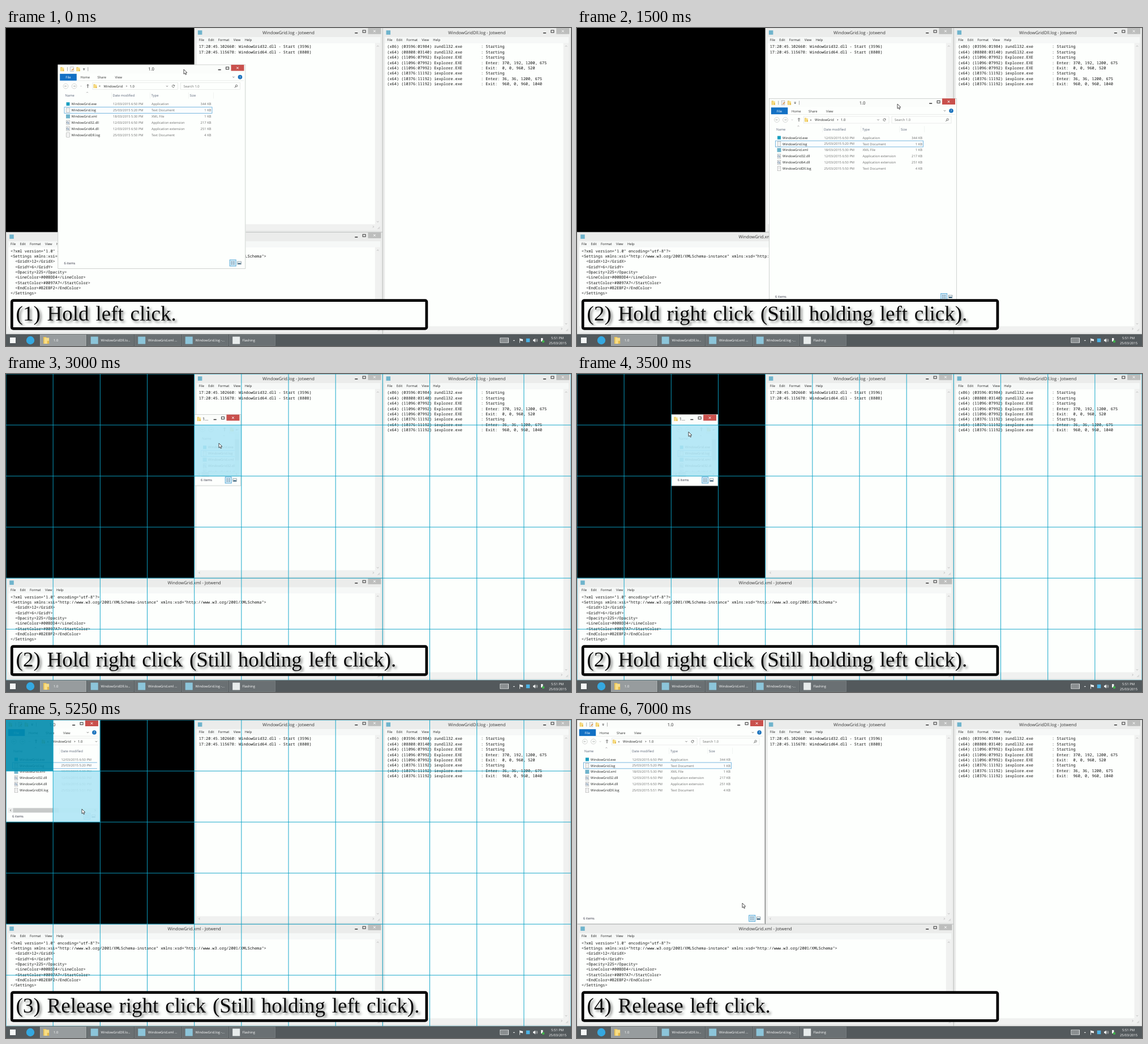
Animation, 998 px wide and 561 px high, one loop 8000 ms. Source, as an HTML page with a canvas:

```html
<!DOCTYPE html>
<html lang="en">
<head>
<meta charset="utf-8">
<title>Snapping a window to a grid</title>
<style>
html, body { margin: 0; width: 100%; height: 100%; overflow: hidden; background: #000; }
canvas { display: block; }
</style>
</head>
<body>
<canvas id="stage" width="998" height="561"></canvas>
<script>
const ctx = document.getElementById('stage').getContext('2d');
ctx.textRendering = 'geometricPrecision';

const LOOP = 8000;
// A 1920 x 1080 desktop with a 40 px taskbar, scaled to the stage.
const DESK_H = 561 * 1040 / 1080;
const CELL_W = 998 / 12, CELL_H = DESK_H / 6;
const UI = '"Open Sans", "Noto Sans", sans-serif';
const MONO = '"Noto Sans Mono", "DejaVu Sans Mono", monospace';
const SERIF = '"Liberation Serif", "Times New Roman", serif';
const WHITE = '#fdfffd', INK = '#222', GREY = '#6d6d6d', LINE = '#dcdedd';
const APP = 'Jotwend';

const CAPTIONS = [
  [6000, '(4) Release left click.'],
  [4250, '(3) Release right click (Still holding left click).'],
  [1500, '(2) Hold right click (Still holding left click).'],
  [0, '(1) Hold left click.']
];

const LOG = [
  '17:20:45.102660: WindowGrid32.dll - Start (3596)',
  '17:20:45.115678: WindowGrid64.dll - Start (8808)'
];

const DLL_LOG = [
  ['(x86) (03596:01984)', 'rundll32.exe', 'Starting'],
  ['(x64) (08808:03140)', 'rundll32.exe', 'Starting'],
  ['(x64) (11096:07992)', 'Explorer.EXE', 'Starting'],
  ['(x64) (11096:07992)', 'Explorer.EXE', 'Enter: 370, 192, 1200, 675'],
  ['(x64) (11096:07992)', 'Explorer.EXE', 'Exit:  0, 0, 960, 520'],
  ['(x64) (10376:11192)', 'iexplore.exe', 'Starting'],
  ['(x64) (10376:11192)', 'iexplore.exe', 'Enter: 36, 36, 1200, 675'],
  ['(x64) (10376:11192)', 'iexplore.exe', 'Exit:  960, 0, 960, 1040']
].map(([id, exe, event]) => `${id} ${exe.padEnd(20)}: ${event}`);

const XML = [
  '<?xml version="1.0" encoding="utf-8"?>',
  '<Settings xmlns:xsi="http://www.w3.org/2001/XMLSchema-instance" xmlns:xsd="http://www.w3.org/2001/XMLSchema">',
  '  <GridX>12</GridX>',
  '  <GridY>6</GridY>',
  '  <Opacity>225</Opacity>',
  '  <LineColor>#00BDD4</LineColor>',
  '  <StartColor>#0097A7</StartColor>',
  '  <EndColor>#B2EBF2</EndColor>',
  '</Settings>'
];

const FILES = [
  ['WindowGrid.exe', '12/03/2015 6:50 PM', 'Application', '344 KB', 'app'],
  ['WindowGrid.log', '25/03/2015 5:20 PM', 'Text Document', '1 KB', 'page'],
  ['WindowGrid.xml', '18/03/2015 5:30 PM', 'XML File', '1 KB', 'note'],
  ['WindowGrid32.dll', '12/03/2015 6:50 PM', 'Application extension', '217 KB', 'gear'],
  ['WindowGrid64.dll', '12/03/2015 6:50 PM', 'Application extension', '251 KB', 'gear'],
  ['WindowGridDll.log', '', 'Text Document', '4 KB', 'page']
];

// ---- drawing helpers ----

function rect(x, y, w, h, color) {
  ctx.fillStyle = color;
  ctx.fillRect(x, y, w, h);
}

function frame(x, y, w, h, color, width = 0.6) {
  ctx.strokeStyle = color;
  ctx.lineWidth = width;
  ctx.strokeRect(x, y, w, h);
}

function path(points, color, width = 0.9) {
  ctx.beginPath();
  points.forEach(([x, y]) => ctx.lineTo(x, y));
  ctx.strokeStyle = color;
  ctx.lineWidth = width;
  ctx.stroke();
}

function shape(points, color) {
  ctx.beginPath();
  points.forEach(([x, y]) => ctx.lineTo(x, y));
  ctx.closePath();
  ctx.fillStyle = color;
  ctx.fill();
}

function circle(x, y, r, fill, stroke) {
  ctx.beginPath();
  ctx.arc(x, y, r, 0, Math.PI * 2);
  if (fill) { ctx.fillStyle = fill; ctx.fill(); }
  if (stroke) { ctx.strokeStyle = stroke; ctx.lineWidth = 0.7; ctx.stroke(); }
}

// y is the vertical middle of the capitals.
function text(str, x, y, { size = 5.85, color = INK, align = 'left', family = UI } = {}) {
  ctx.font = `${size}px ${family}`;
  ctx.fillStyle = color;
  ctx.textAlign = align;
  ctx.fillText(str, x, y + size * 0.36);
}

function clipped(x, y, w, h, draw) {
  ctx.save();
  ctx.beginPath();
  ctx.rect(x, y, w, h);
  ctx.clip();
  draw();
  ctx.restore();
}

// dx, dy point along the chevron's direction.
function chevron(x, y, dx, dy, color = '#777', s = 1.7) {
  path([
    [x - dx * s / 2 - dy * s, y - dy * s / 2 - dx * s],
    [x + dx * s / 2, y + dy * s / 2],
    [x - dx * s / 2 + dy * s, y - dy * s / 2 + dx * s]
  ], color, 0.8);
}

// ---- icons, centred on x, y ----

function folder(x, y, s = 1) {
  rect(x - 3.4 * s, y - 4 * s, 3.6 * s, 8 * s, '#e9c255');
  rect(x - 2.2 * s, y - 3 * s, 5.6 * s, 7 * s, '#f8de86');
  rect(x + 1.2 * s, y + 0.6 * s, 2.2 * s, 3.4 * s, '#e5b94a');
}

function page(x, y) {
  rect(x - 2.8, y - 3.8, 5.6, 7.6, '#fff');
  frame(x - 2.8, y - 3.8, 5.6, 7.6, '#9b9b9b');
  for (let i = -2; i <= 2; i += 1.4) rect(x - 1.7, y + i, 3.4, 0.4, '#c4c4c4');
}

function appSquare(x, y, side, color = '#6fb4cc') {
  rect(x - side / 2, y - side / 2, side, side, color);
}

function fileIcon(kind, x, y) {
  if (kind === 'app') return appSquare(x, y, 6, '#1b9fc0');
  if (kind === 'note') return appSquare(x, y, 7);
  page(x, y);
  if (kind === 'gear') {
    circle(x - 0.6, y, 1.6, null, '#55789a');
    circle(x + 1, y + 1.4, 1, '#8aa5bd');
  }
}

function captionButtons(right, top, active) {
  const closeX = right - (active ? 27 : 25.3);
  const shift = active ? 1.3 : 0;
  rect(right - 48.5 - shift, top + 8, 5, 1.5, '#333');
  frame(right - 34.6 - shift, top + 4, 5, 4, '#333', 1);
  rect(closeX, top, 23, 10.7, active ? '#c9504c' : '#bdbebd');
  const cx = closeX + 11.5, cy = top + 5.6;
  path([[cx - 1.8, cy - 1.8], [cx + 1.8, cy + 1.8]], '#fff', 1);
  path([[cx - 1.8, cy + 1.8], [cx + 1.8, cy - 1.8]], '#fff', 1);
}

// ---- windows ----

function editor(left, top, right, bottom, file, lines) {
  rect(left, top, right - left, bottom - top, '#ebeceb');
  frame(left + 0.3, top, right - left - 0.6, bottom - top - 0.3, '#c3c5c4');
  appSquare(left + 10, top + 8, 7.5);
  text(`${file} - ${APP}`, (left + right) / 2, top + 8, { size: 7.62, color: '#333', align: 'center' });
  captionButtons(right - 0.6, top, false);

  const inX = left + 4, inR = right - 4, inB = bottom - 4.5;
  rect(inX, top + 16, inR - inX, 10.5, '#f6f8f7');
  ['File', 'Edit', 'Format', 'View', 'Help'].forEach((label, i) =>
    text(label, left + [8, 24.5, 42, 69, 89][i], top + 21));
  rect(inX, top + 26.5, inR - inX, inB - top - 26.5, WHITE);
  rect(inR - 9.5, top + 26.5, 9.5, inB - top - 26.5, '#f0f1f0');
  rect(inX, inB - 9.5, inR - inX, 9.5, '#f0f1f0');
  chevron(right - 8.6, top + 32, 0, -1, '#aaa');
  chevron(right - 8.6, inB - 14, 0, 1, '#aaa');
  chevron(left + 9, inB - 5, -1, 0, '#aaa');
  chevron(right - 16.6, inB - 5, 1, 0, '#aaa');
  for (let i = 0; i < 3; i++) path([[inR - 1.5 - i * 1.7, inB - 1], [inR - 1, inB - 1.5 - i * 1.7]], '#b5b5b5', 0.7);

  lines.forEach((line, i) =>
    text(line, left + 8, top + 33 + i * 9.34, { size: 6.91, family: MONO, color: '#111' }));
}

function addressBar(w, y) {
  circle(14, y, 4.4, null, '#c2c4c3');
  circle(29, y, 4.4, null, '#c2c4c3');
  for (const [x, d] of [[14, -1], [29, 1]]) {
    path([[x - 2, y], [x + 2, y]], '#b3b5b4');
    chevron(x + d * 1.4, y, d, 0, '#b3b5b4', 1.3);
  }
  chevron(41, y, 0, 1, '#aaa', 1);
  path([[53, y + 3], [53, y - 2.6]], '#555', 1);
  chevron(53, y - 2.2, 0, -1, '#555', 2);

  const search = w > 300 ? 105 : w > 200 ? 62 : 0;
  const end = search ? w - 15 - search : w + 8;
  frame(61.5, y - 6, end - 61.5, 12, LINE);
  folder(66, y, 0.85);
  text('«', 72.5, y - 0.4);
  text('WindowGrid', 81, y);
  chevron(121.5, y, 1, 0, '#333', 1.2);
  text('1.0', 127, y);
  chevron(search ? end - 19 : w - 6.5, y, 0, 1, '#555', 1.5);
  if (!search) return;
  ctx.beginPath();
  ctx.arc(end - 8, y, 2.1, 0.4, 5.6);
  ctx.strokeStyle = '#555';
  ctx.lineWidth = 0.8;
  ctx.stroke();
  shape([[end - 6.8, y - 2.6], [end - 4.8, y - 0.6], [end - 7.2, y - 0.2]], '#555');
  frame(w - 10 - search, y - 6, search, 12, LINE);
  text('Search 1.0', w - 5 - search, y, { color: GREY });
  circle(w - 16.4, y - 0.6, 1.7, null, '#444');
  path([[w - 17.6, y + 0.6], [w - 19.6, y + 2.6]], '#444', 1);
}

function fileList(dy, logTime) {
  const muted = { color: GREY }, head = { color: '#5a6478' };
  text('Name', 13, 54.5 + dy, head);
  text('Date modified', 97, 54.5 + dy, head);
  text('Type', 165, 54.5 + dy, head);
  text('Size', 233, 54.5 + dy, head);
  chevron(52, 49 + dy, 0, -1, '#888', 1.3);
  for (const x of [94.5, 162.5, 230.5, 274.5]) rect(x, 49 + dy, 0.6, 11, '#e8ebea');

  FILES.forEach(([name, date, type, size, icon], i) => {
    const y = 69.5 + dy + i * 10.9;
    if (i === 1) {
      rect(11.5, y - 5.4, 261, 10.8, '#fafdfe');
      frame(11.5, y - 5.4, 261, 10.8, '#6bb0dc', 0.9);
    }
    fileIcon(icon, 18, y);
    text(name, 24, y);
    text(date || `25/03/2015 ${logTime} PM`, 97.5, y, { ...muted, size: 5.75 });
    text(type, 165.5, y, muted);
    text(size, 271, y, { ...muted, align: 'right' });
  });
}

function explorer([x, y, w, h], logTime) {
  const mini = h < 150, dy = mini ? -11.5 : 0;
  ctx.save();
  ctx.translate(x, y);
  rect(0, 0, w, h, '#fbfdfb');
  frame(0.3, 0.3, w - 0.9, h - 0.6, '#b4b8b6');

  folder(7.8, 8, 0.9);
  if (mini) {
    text('1...', 14, 8.3, { size: 7.4 });
  } else {
    rect(16.5, 4.5, 0.7, 7, '#888');
    page(25, 8);
    path([[24.5, 10.5], [28, 7]], '#d9822b', 1.2);
    folder(36, 8, 0.9);
    rect(44.5, 6.6, 3.4, 0.7, '#444');
    shape([[44.5, 8.2], [47.9, 8.2], [46.2, 9.9]], '#444');
    rect(53, 4.5, 0.7, 7, '#888');
    text('1.0', w / 2 - 1, 8, { size: 7.6, align: 'center' });
  }
  captionButtons(w + 1, 0.3, true);

  clipped(3.5, 15.5, w - 7, h - 19, () => {
    rect(0, 15, w, h, WHITE);
    if (!mini) {
      rect(3.7, 16.2, 29.6, 12, '#1270c4');
      text('File', 18.5, 22.5, { color: '#fff', align: 'center' });
      ['Home', 'Share', 'View'].forEach((label, i) =>
        text(label, 48.3 + i * 29.5, 22.6, { align: 'center', color: '#333' }));
      rect(33.3, 28, w, 0.6, LINE);
      chevron(w - 21.5, 22, 0, 1, '#555', 1.6);
      circle(w - 10, 22, 3.8, '#1a72bd');
      text('?', w - 10, 22.2, { color: '#fff', align: 'center', size: 5.5 });
    }
    addressBar(w, 38 + dy);
    clipped(3, 46 + dy, w - 8, h - 64 - dy, () => fileList(dy, logTime));
    if (mini) {
      rect(71, 34, 8, 67, '#eff1f0');
      rect(71.5, 44, 7, 37, '#c6c9c8');
    }
    if (w < 270) {
      const barY = h - 25;
      rect(3.5, barY, w - 7, 9, '#eff1f0');
      rect(12.5, barY + 0.6, mini ? 13 : (w - 25) * 0.57, 7.8, '#c6c9c8');
      chevron(8.3, barY + 4.5, -1, 0, '#444');
      chevron(w - 8.5, barY + 4.5, 1, 0, '#444');
    }
    rect(3.5, h - 16, w - 7, 12.5, WHITE);
    text('6 items', 11, h - 10, { color: '#334' });
    const bx = w - 28.3, by = h - 15.6;
    rect(bx, by, 11, 11, '#d5ecf8');
    frame(bx, by, 11, 11, '#4ba3d3', 0.9);
    for (let i = 0; i < 3; i++) {
      rect(bx + 2.2, by + 2.6 + i * 2.4, 2.6, 1, '#5a7f98');
      rect(bx + 5.8, by + 2.6 + i * 2.4, 2.8, 1, '#5a7f98');
    }
    frame(w - 14.6, h - 12.6, 6.4, 4.8, '#768b98', 0.8);
    rect(w - 14, h - 10, 5.2, 2, '#37617d');
  });
  ctx.restore();
}

// ---- overlays ----

function grid(start, end) {
  const cell = ([col, row], color) =>
    rect(col * CELL_W, row * CELL_H, CELL_W, CELL_H, color);
  cell(end, 'rgba(176, 230, 245, 0.9)');
  if (start) cell(start, 'rgba(0, 139, 172, 0.9)');
  ctx.fillStyle = 'rgba(12, 163, 200, 0.9)';
  for (let i = 0; i <= 12; i++) ctx.fillRect(i * CELL_W - 0.52, 0, 1.04, DESK_H);
  for (let i = 0; i <= 6; i++) ctx.fillRect(0, i * CELL_H - 0.52, 998, 1.04);
}

function cursor([x, y]) {
  const outline = [[0, 0], [0, 8.2], [1.9, 6.5], [3.2, 9.4], [4.6, 8.8], [3.4, 6], [5.8, 5.8]]
    .map(([px, py]) => [x + px, y + py]);
  shape(outline, '#fff');
  path([...outline, outline[0]], '#222', 0.8);
}

function caption(str) {
  ctx.beginPath();
  ctx.roundRect(10.3, 480.7, 732.6, 49.6, 2.5);
  ctx.fillStyle = WHITE;
  ctx.fill();
  ctx.strokeStyle = '#000';
  ctx.lineWidth = 4.8;
  ctx.stroke();
  ctx.save();
  ctx.shadowColor = 'rgba(0, 0, 0, 0.5)';
  ctx.shadowBlur = 4;
  ctx.shadowOffsetX = 3;
  ctx.shadowOffsetY = 3;
  ctx.wordSpacing = '2.6px';
  text(str, 17.6, 502.6, { size: 37, family: SERIF, color: '#0a0a0a' });
  ctx.restore();
}

function taskbar() {
  rect(0, DESK_H, 998, 21, '#53595c');
  rect(0, DESK_H, 998, 0.8, '#6f7577');
  appSquare(12, 551, 10, '#f4f6f6');
  circle(43, 551, 7.2, '#35a8e0');
  ['1.0', 'WindowGridDll.lo...', 'WindowGrid.xml ...', 'WindowGrid.log -...', 'Flashing'].forEach((label, i) => {
    const x = 60 + i * 83.5;
    rect(x, 541.2, 82, 19.4, i ? '#6a7073' : '#979c9e');
    frame(x + 0.3, 541.4, 81.4, 19, i ? '#7d8385' : '#b0b4b5');
    if (i === 0) folder(x + 11, 551, 1.5);
    else appSquare(x + 12.7, 551, 13, i < 4 ? '#8cc5da' : '#e8ecec');
    text(label, x + 24 - (i === 4 ? 0.5 : 0), 551, { color: '#fff' });
  });

  const light = '#f2f4f4';
  frame(873, 547, 14.5, 8, light, 1);
  for (let row = 0; row < 3; row++)
    for (let col = 0; col < 6; col++) rect(874.6 + col * 2.1, 548.6 + row * 1.9, 1.3, 1.1, light);
  shape([[895.6, 552], [899, 552], [897.3, 550.2]], light);
  path([[907.5, 547.5], [907.5, 555.5]], light);
  shape([[908, 548], [913, 549], [913, 552.4], [908, 551.6]], light);
  appSquare(922, 551, 6.5, '#4bb3e6');
  shape([[931, 549.6], [932.8, 549.6], [935, 547.4], [935, 554.8], [932.8, 552.6], [931, 552.6]], light);
  for (const r of [2, 4]) {
    ctx.beginPath();
    ctx.arc(934.6, 551, r, -0.8, 0.8);
    ctx.strokeStyle = light;
    ctx.lineWidth = 0.7;
    ctx.stroke();
  }
  rect(945, 547, 3.4, 6, light);
  circle(949, 553, 2.3, '#3fb04a');
  text('5:51 PM', 974, 547, { color: '#fff', align: 'center' });
  text('25/03/2015', 974.5, 555.6, { color: '#fff', align: 'center' });
}

// ---- timeline ----

function sceneAt(t) {
  const steps = since => Math.floor((t - since) / 250);
  if (t < 2500) {
    const [x, y, cx, cy] =
      t < 1000 ? [91.5, 64.6, 314, 73] :
      t < 1250 ? [204.5, 91, 438, 99] : [339, 124, 566, 134];
    return { win: [x, y, 332, 360], pointer: [cx, cy] };
  }
  if (t < 5250) {
    const k = Math.min(steps(2500), 6);
    const end = [6 - k, k < 6 ? 1 : 0];
    return {
      win: [end[0] * CELL_W + 0.4, (end[1] + 0.5) * CELL_H - 63.7, 82.4, 126],
      end,
      pointer: [555 - 89.5 * k, 142 - 10 * k]
    };
  }
  if (t < 7000) {
    const k = Math.min(steps(5250), 2), span = k + 2;
    return {
      win: [0, 0, span * CELL_W - 0.4, span * CELL_H - 0.2],
      start: [0, 0],
      end: [span - 1, span - 1],
      pointer: [134 + 71.2 * k, 157 + 77.6 * k]
    };
  }
  return { win: [0, 0, 4 * CELL_W - 0.6, 4 * CELL_H - 0.2], pointer: [292, 323] };
}

function draw(t) {
  const { win, start, end, pointer } = sceneAt(t);
  const midX = 8 * CELL_W, midY = 4 * CELL_H;
  rect(0, 0, 998, 561, '#000');
  editor(0, midY, midX, DESK_H, 'WindowGrid.xml', XML);
  editor(4 * CELL_W, 0, midX, midY, 'WindowGrid.log', LOG);
  editor(midX, 0, 998, DESK_H, 'WindowGridDll.log', DLL_LOG);
  explorer(win, t < 2500 ? '5:50' : '5:51');
  if (end) grid(start, end);
  taskbar();
  cursor(pointer);
  caption(CAPTIONS.find(([from]) => t >= from)[1]);
}

let began;
function tick(now) {
  began ??= now;
  draw((now - began) % LOOP);
  requestAnimationFrame(tick);
}
requestAnimationFrame(tick);
</script>
</body>
</html>
```
